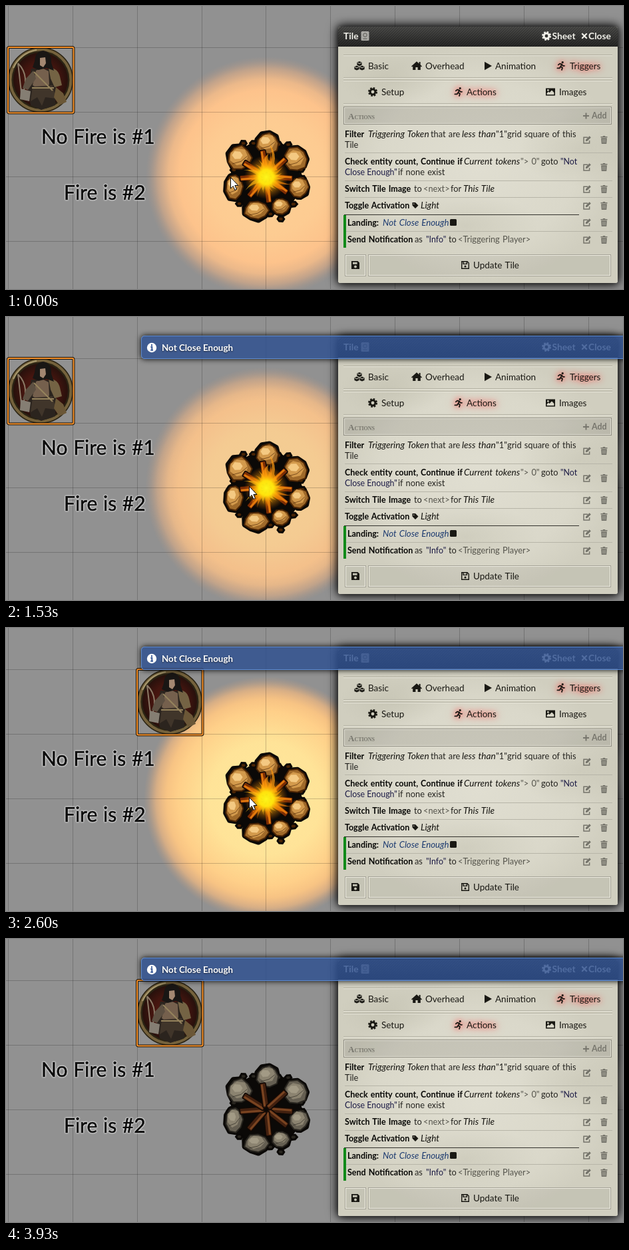
These frames come from a looping animation (927x425 px, 4670 ms). An HTML page:

```html
<!DOCTYPE html>
<html lang="en">
<head>
<meta charset="utf-8">
<title>Campfire tile</title>
<style>
  html, body { margin: 0; width: 100%; height: 100%; overflow: hidden; background: #919191; }
  #stage { position: absolute; left: 0; top: 0; width: 927px; height: 425px; overflow: hidden; font-family: Lato, sans-serif; }
  svg { display: block; }
  text { font: 12.8px Lato, sans-serif; word-spacing: 1px; fill: #24231f; white-space: pre; }
  text.b { font-size: 12.5px; font-weight: 700; fill: #080806; }
  text.i { font-size: 13.6px; font-style: italic; fill: #151410; }
  text.q { font-size: 12.4px; word-spacing: 0; fill: #1c1b45; }
  text.n { font-size: 13.2px; fill: #1d3b70; font-style: italic; }
  text.g { fill: #55544c; }
  text.tab { font-size: 13.5px; fill: #191813; }
  text.head { font-size: 13.8px; font-weight: 700; fill: #f2f1ea; }
  text.add { font-size: 12.4px; font-weight: 700; fill: #77766d; }
  text.caps { font: 700 13px "Liberation Serif", serif; fill: #77766d; }
  text.caps tspan { font-size: 8px; }
  text.label { font-size: 30px; fill: #0c0c0c; stroke: #0c0c0c; stroke-width: .6;
    filter: drop-shadow(0 0 .8px #fff) drop-shadow(0 0 .6px #fff); }
  .glow { filter: drop-shadow(0 0 4px #f22a) drop-shadow(0 0 6px #f448); }
  .panel { filter: drop-shadow(0 0 8px #000) drop-shadow(0 0 3px #0008); }
  #note { position: absolute; left: 203px; top: 28px; width: 740px; box-sizing: border-box; overflow: hidden;
    background: rgba(46, 80, 145, .82); border: 1px solid #5b8ad2; border-radius: 5px; box-shadow: 0 0 9px #000;
    color: #fff; font-size: 13.4px; font-weight: 700; line-height: 18px; text-shadow: 0 1px 2px #0009; }
  #note span { position: absolute; left: 30px; white-space: pre; }
  #note svg { position: absolute; left: 7px; }
</style>
</head>
<body>
<div id="stage">
  <svg id="scene" width="927" height="425" viewBox="0 0 927 425"></svg>
  <div id="note">
    <svg width="16" height="18"><circle cx="8" cy="9" r="7.2" fill="#fff"/><path d="M8 4v2.4M6.4 8H8.3V12.6M6.2 12.8h3.8" fill="none" stroke="#3b5b98" stroke-width="2"/></svg>
    <span>Not Close Enough</span>
  </div>
</div>
<script>
const LOOP = 4670, STEP = 1000 / 15, LAST = 59;
const NOTE_AT = 17, EMBERS_AT = 46, DARK_AT = 47;

let seed = 11;
const rand = (a, b) => {
  seed = (seed * 16807) % 2147483647;
  return a + (b - a) * seed / 2147483647;
};
const each = (list, fn) => list.map(fn).join('');
const rect = (x, y, w, h, attrs = '') => `<rect x="${x}" y="${y}" width="${w}" height="${h}" ${attrs}/>`;
const line = (x1, y1, x2, y2, color, width = 1) =>
  `<path d="M${x1} ${y1}L${x2} ${y2}" stroke="${color}" stroke-width="${width}"/>`;
const text = (x, y, str, cls = '') =>
  `<text x="${x}" y="${y}" class="${cls}">${str.replace(/</g, '&lt;').replace(/>/g, '&gt;')}</text>`;
const gradient = (id, stops) => `<radialGradient id="${id}">${each(stops, ([at, color, alpha = 1]) =>
  `<stop offset="${at}" stop-color="${color}" stop-opacity="${alpha}"/>`)}</radialGradient>`;

// ---- icons, centred on 0,0 ----
const OUTLINE = 'fill="none" stroke="currentColor"';
const ICONS = {
  gear: `<circle r="3.9" ${OUTLINE} stroke-width="3"/><circle r="5.8" ${OUTLINE} stroke-width="2.4" stroke-dasharray="2.5 2.055"/>`,
  run: `<circle cx="2.2" cy="-5.4" r="1.6"/><path d="M-4.2 -1.6L-2 -3.4 1 -2.6 -.6 1 2 2.7 1 6M1 -2.4L2.8 -.2H5M-1 1.2L-2.4 3.4H-5.6" ${OUTLINE} stroke-width="1.8" stroke-linejoin="round" stroke-linecap="round"/>`,
  cubes: '<path d="M0 -7L3.6 -5.2V-1.5L0 .2 -3.6 -1.5V-5.2zM-4 -.4L-.4 1.2V4.9L-4 6.6 -7.6 4.9V1.2zM4 -.4L7.6 1.2V4.9L4 6.6 .4 4.9V1.2z"/><path d="M-2.7 -4.7L0 -3.4 2.7 -4.7M-6.7 1.7L-4 3 -1.3 1.7M1.3 1.7L4 3 6.7 1.7" fill="none" stroke="#d9d7c9"/>',
  home: '<path d="M-8 .4L0 -6.8 3.6 -3.6V-6H5.6V-1.8L8 .4 7 1.4 5.8 .4V6H1.6V2H-1.6V6H-5.8V.4L-7 1.4z"/>',
  play: '<path d="M-5 -6.3L6 0 -5 6.3z"/>',
  image: '<path fill-rule="evenodd" d="M-7 -5.5H7V5.5H-7zM-5.4 4H5.4V1L2 -2.6 -1.4 1 -3 -.4 -5.4 2zM-5 -2.6a1.4 1.4 0 1 0 2.8 0 1.4 1.4 0 1 0-2.8 0"/>',
  plus: '<path d="M-1 -4.5H1V-1H4.5V1H1V4.5H-1V1H-4.5V-1H-1z"/>',
  cross: `<path d="M-3.7 -3.7L3.7 3.7M3.7 -3.7L-3.7 3.7" ${OUTLINE} stroke-width="2.2"/>`,
  edit: `<path d="M1 -3.7H-5V5H3.6V1" ${OUTLINE} stroke-width="1.5"/><path d="M-2.2 2.2L-1.7 -.6 3.6 -5.8 5.8 -3.6 .5 1.7z"/>`,
  trash: '<path d="M-5 -5H-2L-1.4 -6H1.4L2 -5H5V-3.5H-5zM-4.3 -2.8H4.3L3.7 6H-3.7z"/><path d="M-1.9 -1.2V4.5M0 -1.2V4.5M1.9 -1.2V4.5" stroke="#bbb9ac" stroke-width=".7"/>',
  tag: '<path fill-rule="evenodd" d="M-4.5 -4.5H0L4.5 0 0 4.5 -4.5 0zM-3 -2.3a.8 .8 0 1 0 1.6 0 .8 .8 0 1 0-1.6 0"/>',
  disk: '<path fill-rule="evenodd" d="M-6 -6H3.5L6 -3.5V6H-6zM-4 -4.3V-1.2H2.6V-4.3zM-2 2.4a2 2 0 1 0 4 0 2 2 0 1 0-4 0"/>',
  diskLine: `<path d="M-5.3 -5.3H3L5.3 -3V5.3H-5.3zM-3 -5V-1.6H2.4V-5" ${OUTLINE} stroke-width="1.4"/><circle cy="2" r="1.5"/>`,
  book: '<rect x="-5.5" y="-7" width="12" height="14" rx="1.5" fill="#aaa9a4"/><circle cy="-1.4" cx=".5" r="2.7" fill="none" stroke="#55544f"/><path d="M-2.5 4.2H3.5" stroke="#55544f"/>',
};
const icon = (name, x, y, color = '#191813') =>
  `<g transform="translate(${x} ${y})" fill="${color}" color="${color}">${ICONS[name]}</g>`;

// ---- campfire ----
function blob(cx, cy, rx, ry, n = 9) {
  const points = Array.from({ length: n }, (_, i) => {
    const a = i / n * 2 * Math.PI, k = rand(.9, 1.08);
    return (cx + Math.cos(a) * rx * k).toFixed(1) + ' ' + (cy + Math.sin(a) * ry * k).toFixed(1);
  });
  return `M${points.join('L')}z`;
}
const STONES = [[393, 206, 17, 16], [435, 230, 18, 18], [440, 272, 14, 15], [413, 301, 13, 12],
  [376, 307, 18, 14], [343, 271, 13, 19], [351, 228, 18, 18]];
const LOGS = [4, 38, 84, 131, 176, 212, 262, 318];

function campfire(lit) {
  seed = 11;
  const [edge, body, face, shine] = lit
    ? ['#4a2405', '#a06a2a', '#d39a4c', '#ffd894'] : ['#28251f', '#655f52', '#8b8370', '#aaa18c'];
  const wood = lit ? ['#7a2c04', '#e0780f'] : ['#42200f', '#7a4421'];
  const base = each(STONES, s => `<path d="${blob(...s)}" stroke-width="8"/>`);
  const pebbles = each([...Array(26).keys()], i => {
    const a = i / 26 * 6.283, r = rand(46, 62);
    return `<path d="${blob(391 + r * Math.cos(a), 259 + r * 1.06 * Math.sin(a), 5, 4, 6)}" fill="${edge}" stroke="#0a0806" stroke-width="3"/>`;
  });
  const stones = each(STONES, ([x, y, w, h]) =>
    `<path d="${blob(x, y, w, h)}" fill="${body}" stroke="${edge}" stroke-width="2"/>
     <path d="${blob(x - 1, y - 2, w * .76, h * .72, 7)}" fill="${face}"/>
     <path d="${blob(x - 3, y - 4, w * .46, h * .36, 6)}" fill="${shine}" opacity=".75"/>
     <path d="M${x - w * .6} ${y + h * .5}L${x + 2} ${y + h * .3} ${x + w * .65} ${y - h * .15}" fill="none" stroke="${edge}" opacity=".65"/>`);
  const logs = each(LOGS, deg =>
    `<g transform="rotate(${deg} 391 256)">${rect(394, 251.5, 37, 9, `rx="2" fill="${wood[0]}" stroke="#100804" stroke-width="1.5"`)}
     ${rect(396, 253, 33, 3, `fill="${wood[1]}"`)}</g>`);
  const flames = !lit ? '' : each([...Array(22).keys()], i => {
    const r = rand(22, 42), w = rand(2, 5);
    return `<path transform="translate(391 257) rotate(${i * 16.4})" d="M8 ${-w}Q${r * .6} ${w} ${r} 0Q${r * .5} ${w + 3} 8 ${w}z" fill="${i % 3 ? '#f57f08' : '#ffc21c'}" opacity=".7"/>`;
  }) + `<path d="M382 246Q385 229 394 222 391 231 398 234 402 222 396 207 407 222 403 236L408 247z" fill="#ff9a12" opacity=".7"/>
    <circle cx="391" cy="257" r="33" fill="url(#flame)"/>`;
  return `<g fill="#0b0907" stroke="#0b0907" stroke-linejoin="round">${base}<ellipse cx="391" cy="257" rx="53" ry="56"/></g>
    ${pebbles}<g stroke-linejoin="round">${stones}</g>${logs}${flames}`;
}

// ---- token portrait, in a 100 px square ----
const token = `<g id="token">
  <circle cx="50" cy="50" r="45" fill="url(#crimson)" stroke="#2b2414" stroke-width="8"/>
  <circle cx="50" cy="50" r="45.5" fill="none" stroke="#75623c" stroke-width="4"/>
  <path d="M9 32A46 46 0 0 1 44 5" fill="none" stroke="#a89a70" stroke-width="2"/>
  <path d="M16 25Q36 45 20 78M16 25L22 77" fill="none" stroke="#8b7a66" stroke-width="2"/>
  <path d="M36 33L30 62 35 88 51 95 72 88 74 60 66 34z" fill="#2b241e"/>
  <path d="M43 36L38 58 50 66 63 57 62 37 52 32z" fill="#75604d"/>
  <path d="M62 32Q76 32 79 45L82 58 71 61 65 48z" fill="#746344"/>
  <path d="M39 36L28 48 23 62 31 65 43 48z" fill="#5d5042"/>
  <path d="M38 60L68 58 73 78 57 76 52 89 45 76 35 82z" fill="#40352a"/>
  <path d="M40 38L68 66M37 62H70" stroke="#94825c" stroke-width="2"/>
  <path d="M73 61L84 70 89 83 78 88 70 76z" fill="#6b5737"/>
  <path d="M20 63L35 67 33 82 19 79z" fill="#857e73"/>
  <path d="M41 22Q42 7 54 6 67 8 66 24L70 36 59 32 47 35 38 31z" fill="#191614"/>
  <path d="M49 17L57 16 58 25 54 31 49 28z" fill="#a38771"/>
  ${rect(1, 1, 98.5, 98.5, 'rx="2" fill="none" stroke="#1a1208" stroke-width="4"')}
  ${rect(1, 1, 98.5, 98.5, 'rx="2" fill="none" stroke="#f7922b" stroke-width="2"')}
</g>`;

// ---- tile window ----
const ROWS = [
  [197, [509, 'Filter', 'b'], [544, 'Triggering Token', 'i'], [638, 'that are'], [685, 'less than', 'i'], [736, '"1"'], [753, 'grid square of this']],
  [213, [509, 'Tile']],
  [238, [509, 'Check entity count, Continue if', 'b'], [688, 'Current tokens', 'i'], [773, '"> 0"', 'g'], [804, 'goto'], [833, '"Not', 'q']],
  [254, [509, 'Close Enough"', 'q'], [589, 'if none exist']],
  [279, [509, 'Switch Tile Image', 'b'], [613, 'to'], [627, '<next>', 'g'], [668, 'for'], [687, 'This Tile', 'i']],
  [304, [509, 'Toggle Activation', 'b'], [623, 'Light', 'i']],
  [330, [513, 'Landing:', 'b'], [566, 'Not Close Enough', 'n']],
  [355, [513, 'Send Notification', 'b'], [614, 'as'], [631, '"Info"', 'q'], [665, 'to'], [679, '<Triggering Player>', 'g']],
];
const TABS = [['cubes', 531, 90, 544, 'Basic'], ['home', 617, 90, 630, 'Overhead'], ['play', 724, 90, 735, 'Animation'],
  ['run', 834, 90, 847, 'Triggers'], ['gear', 551, 129, 564, 'Setup'], ['run', 680, 129, 692, 'Actions'], ['image', 818, 129, 831, 'Images']];
const BAR = 'M499 61V35Q499 31 503 31H915Q919 31 919 35V61z';

const button = (x, w) => rect(x + .5, 373.5, w, 32, 'fill="#0000000d" stroke="#a3a195"') +
  rect(x + 1.5, 374.5, w - 2, 30, 'fill="none" stroke="#eeece1"');

const panel = `<g class="panel">${rect(499, 31, 420, 385, 'rx="4" fill="#d8d6c8"')}</g>
  ${rect(499, 60, 420, 356, 'rx="3" fill="url(#paper)"')}
  <g fill="url(#stain)"><ellipse cx="860" cy="215" rx="90" ry="55"/><ellipse cx="580" cy="110" rx="80" ry="40"/>
  <ellipse cx="690" cy="330" rx="110" ry="50"/></g>
  <path d="${BAR}" fill="url(#bar)"/><path d="${BAR}" fill="url(#weave)"/>
  ${text(507, 50, 'Tile', 'head')}${icon('book', 539, 45)}
  ${icon('gear', 812, 45, '#f2f1ea')}${text(820.5, 50, 'Sheet', 'head')}
  ${icon('cross', 869, 45, '#f2f1ea')}${text(875, 50, 'Close', 'head')}
  ${each([73.5, 107.5, 111.5, 146.5], y => line(507, y, 911, y, '#b0ae9f') + line(507, y + 1, 911, y + 1, '#e9e7db'))}
  ${each(TABS, ([name, x, y, tx, label]) =>
    `<g class="${name === 'run' ? 'glow' : ''}">${icon(name, x, y)}${text(tx, y + 5, label, 'tab')}</g>`)}
  ${rect(507.5, 151.5, 402, 26, 'fill="#0000001a" stroke="#8f8d82"')}
  ${rect(508.5, 152.5, 400, 24, 'fill="none" stroke="#e2e0d4"')}
  <text x="514" y="170" class="caps">A<tspan>CTIONS</tspan></text>
  ${icon('plus', 871.5, 165, '#77766d')}${text(880, 169, 'Add', 'add')}
  ${each([220.5, 262.5, 287.5, 338.5], y => line(509, y, 911, y, '#b7b5a8'))}
  ${each(ROWS, ([y, ...parts]) => each(parts, ([x, str, cls]) => text(x, y, str, cls)))}
  ${each([201, 242, 275, 300, 325, 351], y => icon('edit', 873, y, '#74736a') + icon('trash', 898.5, y, '#74736a'))}
  ${icon('tag', 615, 299.5)}${rect(667, 320, 10, 10, 'rx="1.5" fill="#191813"')}
  ${line(508, 313.5, 861, 313.5, '#34332e')}${rect(507, 314, 4, 49, 'fill="#118a19"')}
  ${button(509, 31)}${button(544, 364)}
  ${icon('disk', 525, 389)}${icon('diskLine', 690, 389)}${text(702, 394, 'Update Tile', 'tab')}`;

const disc = (fill, id) => `<circle id="${id}" cx="390" cy="256" r="181" fill="url(#${fill})"/>`;
document.getElementById('scene').innerHTML = `<defs>
  ${gradient('peach', [[0, '#fdcb92'], [.5, '#fdc891'], [.72, '#fdc18c'], [.81, '#f8bd8a', .86], [.9, '#eeb285', .48], [.96, '#d6a482', .16], [1, '#c09a80', 0]])}
  ${gradient('gold', [[0, '#fff2a0'], [.46, '#ffec9a'], [.72, '#ffd488'], [.81, '#ffcb80', .86], [.9, '#ffc47c', .48], [.96, '#e8b47a', .16], [1, '#d4a375', 0]])}
  ${gradient('flame', [[0, '#fff61a'], [.34, '#ffe60c', .95], [.6, '#ffa806', .5], [1, '#e36a00', 0]])}
  ${gradient('crimson', [[0, '#5c1d16'], [.6, '#42150f'], [1, '#1f0f0b']])}
  ${gradient('paper', [[0, '#e0ded1'], [.7, '#dad8ca'], [1, '#d0cebf']])}
  ${gradient('stain', [[0, '#b9b7a5', .35], [1, '#b9b7a5', 0]])}
  <linearGradient id="bar" x2="0" y2="1"><stop stop-color="#4a4a48"/><stop offset="1" stop-color="#262625"/></linearGradient>
  <pattern id="weave" width="4" height="4" patternUnits="userSpaceOnUse"><path d="M0 4L4 0" stroke="#0004" stroke-width="1"/></pattern>
  </defs>
  ${rect(0, 0, 927, 425, 'fill="#919191"')}
  <g id="light">${disc('peach', 'warm')}${disc('gold', 'bright')}</g>
  ${each([3.5, 100.5, 197.5, 294.5, 390.5, 487.5, 584.5, 681.5, 778.5, 875.5], x => line(x, 0, x, 425, '#0003'))}
  ${each([62.5, 159.5, 256.5, 353.5], y => line(0, y, 927, y, '#0003'))}
  <g id="lit">${campfire(true)}</g><g id="unlit">${campfire(false)}</g>
  ${text(53, 207, 'No Fire is #1', 'label')}${text(87, 291, 'Fire is #2', 'label')}
  ${token}${panel}
  <path id="cursor" d="M0 0V16.5L3.8 13 6.4 19 9 17.8 6.4 12H11.5z" fill="#fff" stroke="#000" stroke-linejoin="round"/>`;

// ---- motion: [step, value, ...] keys at 15 steps per second ----
const POINTER = [[0, 337, 257], [3, 337, 257], [8, 340, 257], [10, 350, 256], [13, 367, 254], [17, 367, 254], [20, 365, 254],
  [50, 365, 254], [51, 366, 255], [56, 366, 255], [57, 369, 258], [58, 279, 346]];
// step, share of gold, strength
const GLOW = [[0, .1, 1], [8, .3, 1], [17, 0, .84], [29, .45, 1], [35, 1, 1], [44, .45, 1]];
const SLIDE = [[16, 0], [17, .49], [18, .93], [19, 1]];

function sample(keys, k) {
  const next = keys.findIndex(key => key[0] > k);
  if (next < 0) return keys[keys.length - 1].slice(1);
  if (next === 0) return keys[0].slice(1);
  const a = keys[next - 1], b = keys[next], u = (k - a[0]) / (b[0] - a[0]);
  return a.slice(1).map((v, i) => v + (b[i + 1] - v) * u);
}
const el = id => document.getElementById(id);
const show = (node, on) => { node.style.display = on ? '' : 'none'; };
const note = el('note');

function draw(time) {
  const k = Math.min(LAST, Math.floor((time + 4) / STEP));
  const [gold, strength] = sample(GLOW, k), [open] = sample(SLIDE, k), [x, y] = sample(POINTER, k);

  show(el('light'), k < DARK_AT);
  el('light').setAttribute('opacity', strength);
  el('bright').setAttribute('opacity', gold);
  for (const id of ['warm', 'bright']) el(id).setAttribute('r', 180 + gold * 4);
  show(el('lit'), k < EMBERS_AT);
  show(el('unlit'), k >= EMBERS_AT);

  const walked = Math.max(0, Math.min(1, (k * STEP - 2217) / 333));
  el('token').setAttribute('transform', `translate(${2 + 194 * walked} 61)`);

  show(el('cursor'), k < LAST);
  el('cursor').setAttribute('transform', `translate(${Math.round(x) + .5} ${Math.round(y) + .5})`);

  show(note, k >= NOTE_AT);
  note.style.height = 35 * open + 'px';
  for (const child of note.children) child.style.top = 8 * open + 'px';
}

const start = performance.now();
function tick() {
  draw((performance.now() - start) % LOOP);
  requestAnimationFrame(tick);
}
tick();
</script>
</body>
</html>
```
